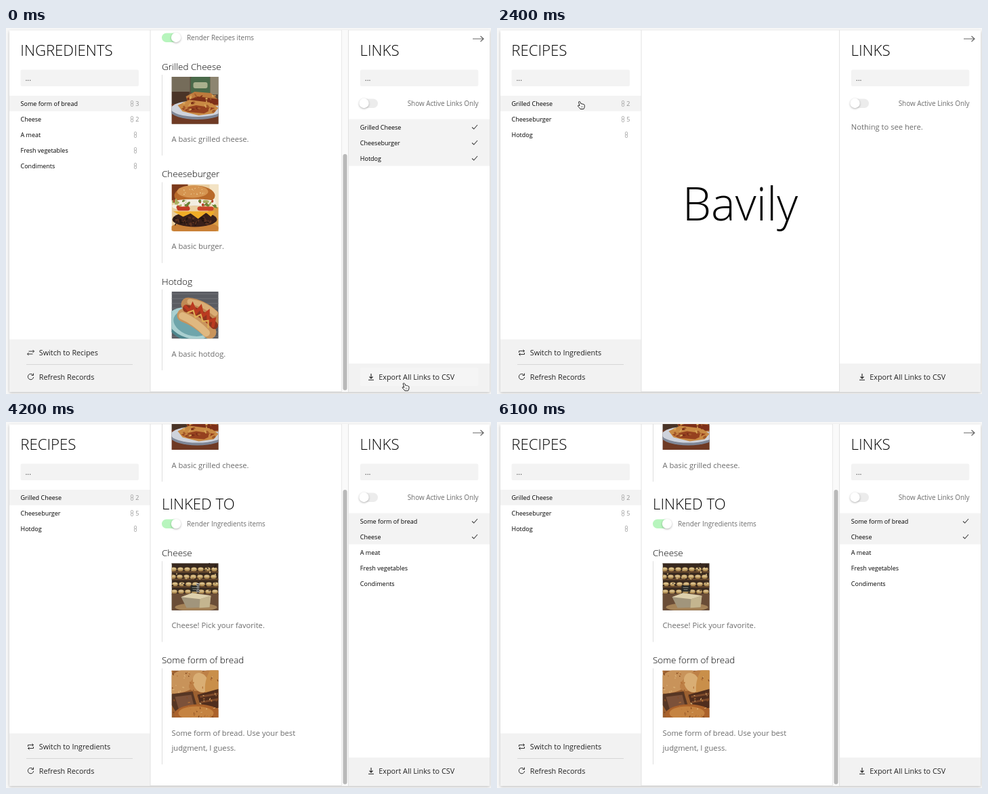
These frames come from a looping animation (716x540 px, 6.2 s). An HTML page with a canvas:

```html
<!DOCTYPE html>
<html lang="en">
<head>
<meta charset="utf-8">
<title>Recipe links</title>
<style>
html, body { margin: 0; width: 100%; height: 100%; overflow: hidden; background: #f8f8f8; }
canvas { display: block; width: 716px; height: 540px; }
</style>
</head>
<body>
<canvas id="stage" width="716" height="540"></canvas>
<script>
const ctx = document.getElementById('stage').getContext('2d');
const LOOP = 6200, STEP = 100;
const SWITCH_AT = 1400, OPEN_AT = 2800;
const PANEL = '#f3f3f3', INK = '#000', SOFT = '#6c6c6c';
const ingredients = ['Some form of bread', 'Cheese', 'A meat', 'Fresh vegetables', 'Condiments'];
const recipes = ['Grilled Cheese', 'Cheeseburger', 'Hotdog'];

// time, x, y, pointer shape until the next key
const pointerPath = [
  [0, 590, 529.5, 'hand'], [100, 591, 529.5, 'hand'], [200, 578, 527, 'arrow'],
  [900, 158.5, 477.5, 'hand'], [1400, 158.5, 477.5, 'arrow'], [2100, 131, 168.5, 'hand'],
  [2400, 124.3, 114, 'hand'], [3100, 124.3, 114, 'hand'], [3200, 133, 121, 'arrow'],
  [3400, 209, 180, 'arrow'], [3700, 283.5, 244.5, 'beam'], [4200, 283.5, 244.5, 'beam'],
  [4800, 288, 455, 'beam'], [4900, 289, 461.5, 'beam'], [5500, 289, 461.5, 'beam'],
  [5700, 303, 474, 'arrow'], [6000, 341, 507, 'arrow']
];
const scrollPath = [[3700, 0], [3800, 4], [3900, 18], [4000, 78], [4100, 114.4]];

function sample(path, t) {
  const next = path.findIndex(key => key[0] > t);
  if (next === 0) return path[0];
  if (next < 0) return path[path.length - 1];
  const a = path[next - 1], b = path[next];
  const u = (t - a[0]) / (b[0] - a[0]), k = u * u * (3 - 2 * u);
  return a.map((v, i) => typeof v === 'number' ? v + (b[i] - v) * k : v);
}

function rect(x, y, w, h, color, radius = 0) {
  ctx.fillStyle = color;
  ctx.beginPath();
  ctx.roundRect(x, y, w, h, radius);
  ctx.fill();
}

function oval(x, y, rx, ry, color, angle = 0) {
  ctx.fillStyle = color;
  ctx.beginPath();
  ctx.ellipse(x, y, rx, ry, angle, 0, Math.PI * 2);
  ctx.fill();
}

function poly(points, color) {
  ctx.fillStyle = color;
  ctx.beginPath();
  points.forEach(p => ctx.lineTo(...p));
  ctx.closePath();
  ctx.fill();
}

function stroke(path, color, width = 1) {
  ctx.strokeStyle = color;
  ctx.lineWidth = width;
  ctx.stroke(new Path2D(path));
}

function text(str, x, y, size, color = INK, weight = 400, align = 'left') {
  ctx.font = `${weight} ${size}px "Open Sans", sans-serif`;
  ctx.textAlign = align;
  ctx.fillStyle = color;
  ctx.fillText(str, x, y);
}

const title = (str, x, y) => text(str, x, y, 22.2, INK, 300);

function shadowed(blur, dy, alpha, paint) {
  ctx.save();
  ctx.shadowColor = `rgba(0,0,0,${alpha})`;
  ctx.shadowBlur = blur;
  ctx.shadowOffsetY = dy;
  paint();
  ctx.restore();
}

function at(x, y, paint) {
  ctx.save();
  ctx.translate(x, y);
  paint();
  ctx.restore();
}

function random(seed) {
  return () => (seed = seed * 16807 % 2147483647) / 2147483647;
}

function specks(seed, count, x, y, w, h, size, colors) {
  const rnd = random(seed);
  for (let i = 0; i < count; i++) {
    oval(x + rnd() * w, y + rnd() * h, size * (.5 + rnd()), size * (.3 + rnd() * .5),
      colors[i % colors.length], rnd() * 3);
  }
}

const photos = {
  toastie() {
    rect(0, 0, 70, 70, '#5b4a3c');
    rect(0, 0, 27, 22, '#756c5a');
    rect(0, 22, 26, 20, '#4a3427');
    rect(28, 0, 29, 24, '#4a6a4a', 3);
    rect(32, 8, 21, 9, '#a9b08d', 3);
    rect(57, 0, 13, 26, '#8d8570');
    rect(0, 40, 70, 30, '#6f3a24');
    oval(38, 50, 40, 13, '#7f8797');
    oval(38, 47, 39, 12, '#cfd3dc');
    poly([[21, 29], [34, 22], [58, 24], [69, 34], [69, 43], [25, 40]], '#bd7a3c');
    poly([[23, 35], [38, 29], [69, 33], [69, 41], [40, 43]], '#7e3019');
    poly([[9, 42], [26, 34], [58, 38], [69, 46], [62, 54], [40, 57], [16, 51]], '#c98a44');
    poly([[14, 47], [36, 42], [64, 46], [48, 54], [24, 52]], '#96411f');
    specks(19, 30, 18, 27, 46, 24, 2.3, ['#d8a65a', '#a35a2a', '#7d3018', '#c88846']);
  },
  burger() {
    rect(0, 0, 70, 70, '#e9cfa2');
    rect(0, 0, 24, 24, '#7c3a1c');
    rect(56, 0, 14, 34, '#f3e3c4');
    rect(54, 34, 16, 36, '#d99c45');
    oval(34, 65, 36, 9, '#c98138');
    oval(34, 17, 30, 15, '#b96a2a');
    oval(31, 11, 23, 9, '#d59450');
    oval(34, 27, 32, 5, '#f2ece0');
    specks(8, 40, 3, 25, 62, 9, 3.6, ['#6b8537', '#f4efe4', '#a9b061', '#b5412a']);
    rect(8, 33, 19, 6, '#c23a24', 3);
    rect(38, 33, 24, 6, '#cb432a', 3);
    oval(34, 52, 33, 11, '#39201a');
    poly([[2, 40], [64, 40], [58, 48], [51, 42], [39, 51], [28, 43], [17, 48]], '#efac27');
    specks(33, 45, 4, 49, 58, 11, 2, ['#24140f', '#5b3220']);
    specks(14, 20, 18, 4, 33, 13, .9, ['#ebc88e']);
  },
  hotdog() {
    rect(0, 0, 70, 70, '#5a5c62');
    for (let y = 3; y < 70; y += 7) rect(0, y, 70, 1, '#6f7276');
    oval(27, 49, 36, 24, '#4d858c', .3);
    oval(28, 47, 35, 22, '#a9cfd0', .3);
    oval(30, 47, 28, 18, '#6fa5ab', .3);
    ctx.lineCap = 'round';
    stroke('M24 19Q46 21 64 40', '#c08a54', 20);
    stroke('M18 35Q38 42 56 60', '#c9945c', 20);
    stroke('M16 36Q35 44 51 61', '#dfb880', 11);
    stroke('M27 15Q47 17 64 32', '#d9ad75', 8);
    stroke('M22 25Q44 29 63 50', '#8f351e', 11);
    stroke('M20 22L27 29L31 20L36 31L43 23L46 36L54 30L54 44L63 41L61 51', '#bb3a20', 4.5);
    stroke('M24 31L32 28L35 38L43 34L46 44L54 43L54 53', '#dfae55', 2.2);
  },
  cheese() {
    rect(0, 0, 70, 70, '#38291f');
    for (let y = 9; y < 47; y += 11) {
      rect(0, y + 3, 70, 2, '#6b4b2e');
      for (let x = 2 + y % 4; x < 70; x += 10) {
        oval(x, y, 4.4, 3, '#b28f55');
        oval(x, y - 1, 3.4, 1.5, '#d9c08c');
      }
    }
    specks(11, 36, 0, 0, 70, 42, 1.5, ['#624a32', '#cdb27c', '#281d18']);
    rect(0, 45, 70, 25, '#6a4d37');
    oval(36, 65, 31, 6, '#a58358');
    poly([[14, 50], [30, 44], [58, 48], [56, 65], [22, 66]], '#a1957c');
    poly([[14, 50], [30, 44], [58, 48], [42, 53]], '#ddd0ad');
    poly([[42, 53], [58, 48], [56, 65], [41, 66]], '#c4b58f');
    rect(28, 33, 13, 9, '#272927');
    stroke('M30 36H38M31 39H37', '#a8a79a', .8);
  },
  bread() {
    rect(0, 0, 70, 70, '#9c6030');
    oval(18, 15, 31, 16, '#c8935a', -.4);
    oval(49, 14, 26, 12, '#bd8046', -.5);
    oval(43, 18, 11, 15, '#d9ae74', -.4);
    oval(64, 19, 14, 27, '#c98f4a', .2);
    poly([[0, 35], [31, 31], [40, 61], [8, 64], [0, 51]], '#563624');
    poly([[5, 39], [29, 36], [34, 56], [11, 59]], '#7c5139');
    poly([[38, 36], [70, 27], [70, 55], [44, 58]], '#4f2d1d');
    stroke('M42 39L70 34M43 47L70 42', '#7c492a', 3);
    oval(39, 65, 35, 15, '#ab622b');
    oval(36, 63, 26, 10, '#c58341');
    specks(23, 60, 0, 0, 70, 70, 1.4, ['#d9ae74', '#83491f', '#b47238']);
  }
};

function item(name, photo, lines, y) {
  text(name, 230, y + 4.7, 13.45, INK, 300);
  rect(230, y + 12, 1, 97 + lines.length * 22.3, '#dedede');
  at(244.5, y + 15, () => {
    ctx.beginPath();
    ctx.rect(0, 0, 69, 69.5);
    ctx.clip();
    photos[photo]();
  });
  lines.forEach((line, i) => text(line, 244.5, y + 111 + i * 22.5, 11.2, SOFT));
}

function toggle(x, y, on) {
  rect(x, y - 6.5, 27, 13.5, on ? '#b7f5bd' : '#ececec', 6.8);
  shadowed(3, 1, .3, () => oval(x + (on ? 21 : 6.5), y, 7.2, 7.2, '#fff'));
}

function linkedHeader(kind, y) {
  title('LINKED TO', 230, y + 7.5);
  toggle(230, y + 29, true);
  text(`Render ${kind} items`, 267, y + 32.5, 9.9, SOFT);
}

function scrollbar(y, h) {
  rect(495, 3, 10, 534, '#fafafa');
  rect(495, 3, 1, 534, '#e8e8e8');
  rect(497.5, y, 6, h, '#b9b9b9', 3);
}

function drawCenter(t) {
  ctx.save();
  ctx.beginPath();
  ctx.rect(213, 3, 292, 534);
  ctx.clip();
  if (t < SWITCH_AT) {
    linkedHeader('Recipes', -15);
    item('Grilled Cheese', 'toastie', ['A basic grilled cheese.'], 57);
    item('Cheeseburger', 'burger', ['A basic burger.'], 215.4);
    item('Hotdog', 'hotdog', ['A basic hotdog.'], 373.8);
    scrollbar(186, 348.5);
  } else if (t < OPEN_AT) {
    ctx.globalAlpha = Math.min(1, (t - SWITCH_AT + 100) / 300);
    text('Bavily', 359, 284, 67.5, INK, 300, 'center');
  } else {
    const scroll = sample(scrollPath, t)[1];
    at(0, -scroll, () => {
      title('RECIPES ITEM', 230, 41);
      item('Grilled Cheese', 'toastie', ['A basic grilled cheese.'], 71);
      linkedHeader('Ingredients', 235.5);
      item('Cheese', 'cheese', ['Cheese! Pick your favorite.'], 307.7);
      item('Some form of bread', 'bread',
        ['Some form of bread. Use your best', 'judgment, I guess.'], 466);
    });
    scrollbar(6 + scroll * .822, 434.5);
  }
  ctx.restore();
}

function searchBox(x) {
  rect(x, 61.5, 174.5, 24.5, PANEL, 2.5);
  text('...', x + 7, 78, 10.8, '#444');
}

function chain(x, y) {
  ctx.strokeStyle = '#b2b2b2';
  ctx.lineWidth = 1;
  ctx.beginPath();
  ctx.roundRect(x - 1.6, y - 4.2, 3.2, 4.5, 1.5);
  ctx.roundRect(x - 1.6, y - .3, 3.2, 4.5, 1.5);
  ctx.stroke();
}

function drawLeft(t) {
  const switched = t >= SWITCH_AT;
  const names = switched ? recipes : ingredients;
  const counts = switched ? ['2', '5'] : ['3', '2'];
  title(switched ? 'RECIPES' : 'INGREDIENTS', 21.3, 41);
  searchBox(21.5);
  rect(5, 100, 208, 22.7, PANEL);
  names.forEach((name, i) => {
    const y = 111 + i * 23;
    text(name, 21.5, y + 3.7, 9);
    chain(counts[i] ? 186 : 191, y + .5);
    if (counts[i]) text(counts[i], 196.3, y + 3.7, 9, '#929292', 400, 'right');
  });

  rect(5, 459.5, 208, 77.5, '#f2f2f2');
  rect(30, 496, 157, 1, '#d6d6d6');
  if (t >= 900 && !switched) {
    shadowed(3, 1, .12, () => rect(21.5, 465.5, 174.5, 27.5, '#fff', 3));
  }
  text(`Switch to ${switched ? 'Ingredients' : 'Recipes'}`, 48.8, 483, 10.8, '#222');
  text('Refresh Records', 48.8, 518.5, 10.8, '#222');
  at(36.5, 479, () => {
    stroke(switched
      ? 'M-4 0V-2.5H4M2-4.5L4-2.5L2-.5M4 0V2.5H-4M-2 .5L-4 2.5L-2 4.5'
      : 'M-3-2H5M3-4L5-2L3 0M3 2H-5M-3 0L-5 2L-3 4', '#333');
  });
  stroke('M39.7 511.8A4.2 4.2 0 1 0 40.7 515M40.5 509.5V512.5H37.5', '#333');
}

function drawRight(t) {
  title('LINKS', 522.6, 41);
  stroke('M689 16H705M700.5 12L705 16L700.5 20', '#666', 1.2);
  searchBox(522.8);
  toggle(522, 111, false);
  text('Show Active Links Only', 697.5, 114.7, 9.9, SOFT, 400, 'right');
  if (t >= SWITCH_AT && t < OPEN_AT) {
    text('Nothing to see here.', 522.8, 150, 11.2, SOFT);
  } else {
    const names = t < SWITCH_AT ? recipes : ingredients;
    const active = t < SWITCH_AT ? 3 : 2;
    rect(506, 134.5, 208, active * 23, PANEL);
    names.forEach((name, i) => {
      const y = 146 + i * 23;
      text(name, 522.8, y + 3.7, 9);
      if (i < active) at(692, y, () => stroke('M-4 .5L-1.3 3L4-3', '#444', 1.1));
    });
  }
  rect(506, 495, 208, 42, '#f2f2f2');
  if (t < 200) rect(522.8, 501, 174.5, 27.5, '#f5f5f5', 3);
  stroke('M539 510V517M536.5 514.5L539 517L541.5 514.5M535 519.3H543', '#222', 1.1);
  text('Export All Links to CSV', 550.3, 518.5, 10.8, '#222');
}

const pointers = {
  hand() {
    const shape = 'M-3.8-5Q-2.5-6.3-1.3-4.6L-.2-2Q.8-2.8 1.7-1.7Q3-2.4 3.6-1.1Q5-1.3 5 .5' +
      'Q5.2 3.6 3.6 5.6H-1.3Q-2.7 3.2-4.9 1.4Q-5-.4-3 .4L-2.3 1Z';
    ctx.fillStyle = '#fff';
    ctx.fill(new Path2D(shape));
    stroke(shape, '#222');
    stroke('M.3 1V3.6M2 1V3.6', '#555', .6);
  },
  arrow() {
    const shape = 'M-4-6V5L-1.5 2.7L0 6.4L2 5.5L.5 2H4Z';
    stroke(shape, '#fff', 1.8);
    ctx.fillStyle = '#111';
    ctx.fill(new Path2D(shape));
  },
  beam() {
    const shape = 'M-2.5-5.5Q0-5.5 0-3.5Q0-5.5 2.5-5.5M0-4V4M-2.5 5.5Q0 5.5 0 3.5Q0 5.5 2.5 5.5M-1.5 1.5H1.5';
    stroke(shape, '#fff', 2.4);
    stroke(shape, '#222', 1.1);
  }
};

function draw(t) {
  rect(0, 0, 716, 540, '#f8f8f8');
  shadowed(4, 1, .25, () => rect(5, 3.5, 709, 533, '#fff'));
  drawCenter(t);
  drawLeft(t);
  drawRight(t);
  rect(212.5, 3, 1, 534, '#e2e2e2');
  rect(505, 3, 1, 534, '#e2e2e2');
  if (t <= 6000) {
    const [, x, y, shape] = sample(pointerPath, t);
    at(x, y, pointers[shape]);
  }
}

const start = performance.now();
function tick() {
  const t = (performance.now() - start) % LOOP;
  draw(Math.floor(t / STEP) * STEP);
  requestAnimationFrame(tick);
}
tick();
</script>
</body>
</html>
```
